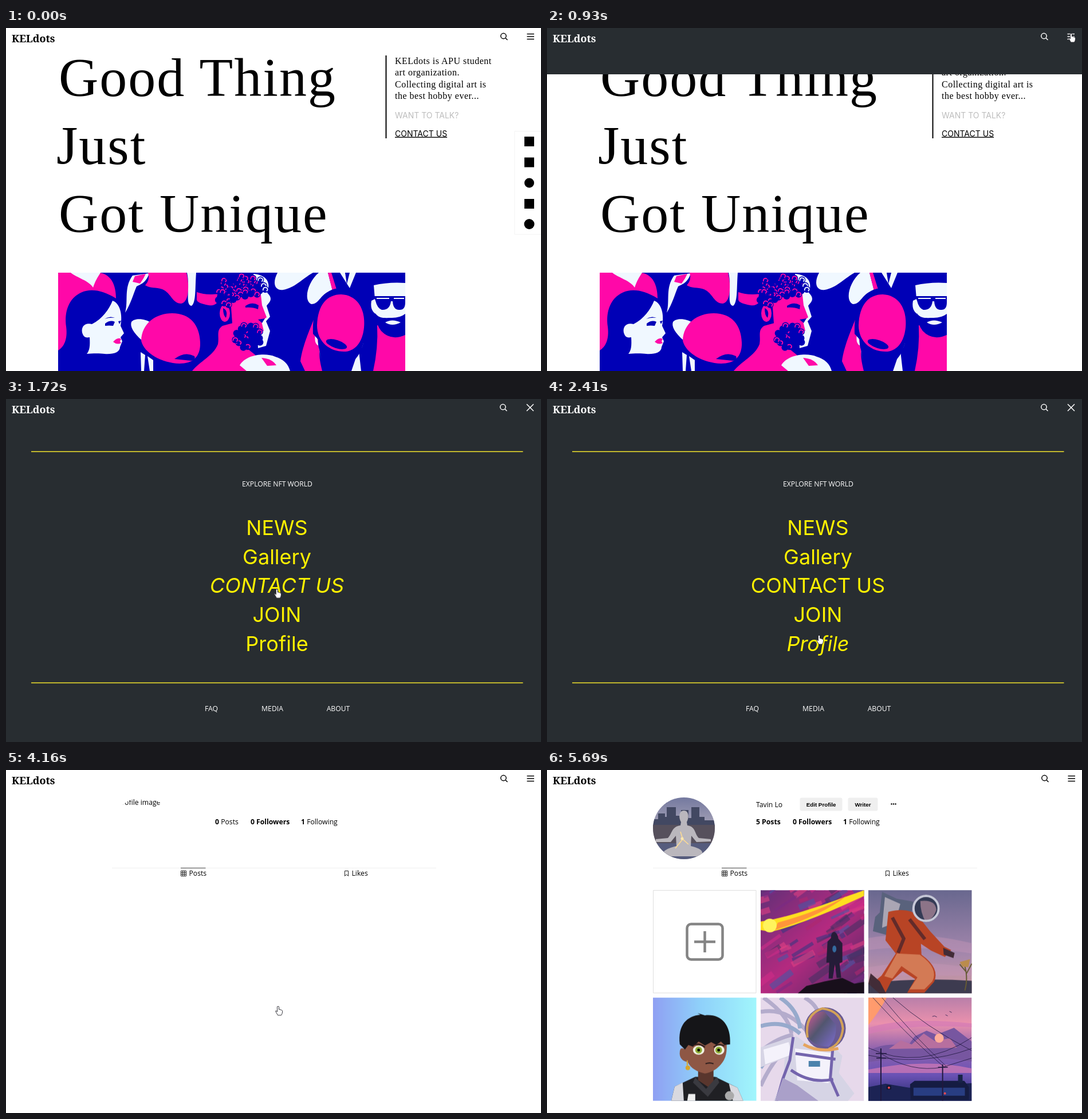
These frames come from a looping animation (934x600 px, 6.18 s). An HTML page:

```html
<!DOCTYPE html>
<html lang="en">
<head>
<meta charset="utf-8">
<title>Student art club</title>
<style>
html, body { margin: 0; width: 100%; height: 100%; overflow: hidden; background: #fff; }
.layer { position: absolute; left: 0; top: 0; width: 934px; height: 600px; overflow: hidden; }
svg { display: block; }
.a { animation: 6180ms step-end infinite; }

.logo { font: 800 18px 'Noto Serif', serif; }
.head { font: 96px 'Liberation Serif', serif; letter-spacing: 2px; }
.intro { font: 16px 'Liberation Serif', serif; letter-spacing: .5px; }
.inter { font: 14px Inter, sans-serif; }
.ui { font: 12.2px 'Open Sans', sans-serif; }
.ui .b { font-weight: 700; }
.btn { font: bold 9.8px 'Liberation Sans', sans-serif; }
.nav { font: 36px Inter, sans-serif; fill: #fff200; text-anchor: middle; }
.line { fill: none; stroke: currentColor; stroke-width: 1.5; }
.blue { fill: #0000b6; }
.pink { fill: #ff08a8; }
.pale { fill: #f0f8ff; }

.shift { animation-name: shift; }
.shift-intro { animation-name: shiftIntro; }
.social { animation-name: social; }
.menu { height: 0; background: #282d31; color: #fff; animation-name: menu; }
.burger { animation-name: burger; }
.close { animation-name: close; }
.news { animation-name: news; }
.gallery { animation-name: gallery; }
.contact { animation-name: contact; }
.join { animation-name: join; }
.prof { animation-name: prof; }
.profile { animation-name: profile; }
.header { animation-name: header; }
.drop { animation-name: drop; }
.icons { animation-name: icons; }
.counts { animation-name: counts; }
.loaded { animation-name: loaded; }
.t1 { animation-name: tiles1; }
.t2 { animation-name: tiles2; }
.t3 { animation-name: tiles3; }
.cursor { animation-name: move; animation-timing-function: linear; }
.hand { animation-name: hand; }
.arrow { animation-name: arrow; }

@keyframes shift { 0% { transform: none } 11.165% { transform: translateX(1px) } }
@keyframes shiftIntro { 0% { transform: none } 11.165% { transform: translateX(10px) } }
@keyframes social { 0% { opacity: 1 } 11.165% { opacity: 0 } }
@keyframes menu {
  0% { height: 0 } 13.107% { height: 8px } 14.078% { height: 30px } 15.049% { height: 81px }
  16.019% { height: 300px } 17.152% { height: 600px } 46.602% { height: 0 }
}
@keyframes burger { 0% { opacity: 1 } 16.019% { opacity: 0 } }
@keyframes close { 0% { opacity: 0 } 16.019% { opacity: 1 } }
@keyframes news { 0% { font-style: normal } 33.01% { font-style: italic } 36.25% { font-style: normal } }
@keyframes gallery {
  0% { font-style: normal } 22.816% { font-style: italic } 25.243% { font-style: normal }
  29.773% { font-style: italic } 33.01% { font-style: normal }
  36.25% { font-style: italic } 37.217% { font-style: normal }
}
@keyframes contact { 0% { font-style: normal } 25.243% { font-style: italic } 29.773% { font-style: normal } }
@keyframes join { 0% { font-style: normal } 37.217% { font-style: italic } 38.9% { font-style: normal } }
@keyframes prof { 0% { font-style: normal } 38.9% { font-style: italic } }
@keyframes profile { 0% { opacity: 0 } 46.602% { opacity: 1 } }
@keyframes header { 0% { opacity: 0 } 47.735% { opacity: 1 } }
@keyframes drop { 0% { transform: translate(-1.5px, -36px) } 47.735% { transform: none } }
@keyframes icons { 0% { opacity: 0 } 48.706% { opacity: 1 } }
@keyframes counts { 0% { opacity: 0 } 67.314% { opacity: 1 } 69.256% { opacity: 0 } }
@keyframes loaded { 0% { opacity: 0 } 69.256% { opacity: 1 } }
@keyframes tiles1 { 0% { opacity: 0 } 74.434% { opacity: 1 } }
@keyframes tiles2 { 0% { opacity: 0 } 75.566% { opacity: 1 } }
@keyframes tiles3 { 0% { opacity: 0 } 76.699% { opacity: 1 } }
@keyframes move {
  0%, .971% { transform: translate(906px, 610px) }
  3.2% { transform: translate(912px, 420px) }
  5.5% { transform: translate(914px, 190px) }
  9.223%, 16.019% { transform: translate(915px, 9px) }
  17.152%, 18.12% { transform: translate(721px, 138px) }
  21.036%, 22.006% { transform: translate(578px, 240px) }
  22.977% { transform: translate(505px, 262px) }
  25.08% { transform: translate(480px, 298px) }
  27.5% { transform: translate(472px, 335px) }
  29.1% { transform: translate(476px, 322px) }
  30.744%, 32.039% { transform: translate(478px, 272px) }
  33.5% { transform: translate(478px, 235px) }
  35.6% { transform: translate(478px, 222px) }
  36.9% { transform: translate(478px, 265px) }
  37.9% { transform: translate(476px, 380px) }
  38.997%, 74.434% { transform: translate(475px, 413px) }
  78% { transform: translate(560px, 440px) }
  83.333%, 87.217% { transform: translate(729px, 462px) }
  92.071%, 100% { transform: translate(882px, 604px) }
}
@keyframes hand {
  0% { opacity: 0 } 3.9% { opacity: 1 } 5.7% { opacity: 0 } 9% { opacity: 1 }
  16.019% { opacity: 0 } 22.7% { opacity: 1 } 74.5% { opacity: 0 }
}
@keyframes arrow {
  0% { opacity: 1 } 3.9% { opacity: 0 } 5.7% { opacity: 1 } 9% { opacity: 0 }
  16.019% { opacity: 1 } 22.7% { opacity: 0 } 74.5% { opacity: 1 }
}
</style>
</head>
<body>
<svg class="layer" viewBox="0 0 934 600">
  <defs>
    <clipPath id="frame"><path d="M91.500 428H697V600H91.500Z"/></clipPath>
    <g id="search" class="line"><circle cx="868" cy="14" r="4.700"/><path d="M871.500 17.500L875 21"/></g>
    <path id="bars" class="line" d="M909.500 10.500H922M909.500 15H922M909.500 19.500H922"/>
    <g id="top">
      <text class="logo" x="10" y="24.500" fill="currentColor">KELdots</text>
      <use href="#search" x=".500"/><use href="#bars"/>
    </g>
  </defs>
  <use href="#top"/>
  <g class="a shift head">
    <text x="92" y="119">Good Thing</text>
    <text x="88" y="238">Just</text>
    <text x="92" y="357">Got Unique</text>
  </g>
  <g class="a shift-intro">
    <path d="M662.500 48H664.500V193H662.500Z"/>
    <g class="intro">
      <text x="679" y="63">KELdots is APU student</text>
      <text x="679" y="83">art organization.</text>
      <text x="679" y="104">Collecting digital art is</text>
      <text x="679" y="124">the best hobby ever...</text>
    </g>
    <g class="inter">
      <text x="679" y="158" fill="#bdbdbd">WANT TO TALK?</text>
      <text x="679" y="189.500" text-decoration="underline">CONTACT US</text>
    </g>
  </g>
  <g class="a social">
    <path d="M940 180.500H888V361H940" fill="none" stroke="#f3f3f3"/>
    <path d="M905 190H922V207H905ZM905 226.500H922V243.500H905ZM905 299H922V316H905Z"/>
    <circle cx="913.500" cy="271" r="8.500"/><circle cx="913.500" cy="343" r="9"/>
  </g>

  <g class="a shift"><g clip-path="url(#frame)">
    <path class="blue" d="M91 428H698V600H91Z"/>
    <!-- woman -->
    <path class="pink" d="M91 428H163C184 431 192 450 192 473C160 453 134 455 117 473C104 488 103 507 105 522C108 545 101 558 91 564Z"/>
    <path class="pale" d="M113 428C124 437 145 442 152 454C156 442 160 436 165 428Z"/>
    <path class="pale" d="M186 477C180 492 168 509 150 518C137 515 131 523 133 533C136 542 140 542 146 541C147 556 146 564 141 570C150 569 166 569 172 570C186 571 199 568 199 558L203 548L200 541L206 534L200 521C204 502 199 481 186 477Z"/>
    <path class="blue" d="M173 517Q182 510 190 514L187 521Q180 520 173 521ZM172 509Q181 503 190 507Q180 506 172 509ZM196 513L201 512L198 518Z"/>
    <path class="pink" d="M187 549Q195 540 201 544L199 548L201 551Q194 555 187 549Z"/>
    <!-- hand and figures above -->
    <path class="pale" d="M208 498C214 477 205 455 221 433L250 429C245 445 236 448 228 452C222 466 218 482 208 498Z"/>
    <path class="pink" d="M225 434L244 430L240 438L234 447L221 444Z"/>
    <path class="pink" d="M248 428H315C321 452 319 480 306 482C290 482 289 464 273 457C261 453 252 456 243 450Q252 440 248 428Z"/>
    <path class="pale" d="M316 428H332C330 455 332 480 324 486C312 485 322 455 316 428Z"/>
    <path class="pink" d="M333 462C345 466 355 467 371 465C375 478 366 487 354 485C343 483 333 480 333 475Z"/>
    <!-- left cap -->
    <path class="pale" d="M238 547C222 533 216 522 219 514C225 506 245 509 252 515L240 540Z"/>
    <path class="pink" d="M236 547C237 516 262 499 290 499C322 499 338 520 339 550C340 576 325 587 303 587C272 586 241 569 236 547Z"/>
    <path class="blue" d="M294 579Q312 565 329 574Q332 581 323 582Z"/>
    <path class="pale" d="M235 567L243 572L241 600H236ZM247 574L257 581V600H251Z"/>
    <!-- bearded man -->
    <path class="pink" d="M325 600C338 583 362 574 370 553C373 540 366 529 378 521L400 515L420 560C436 572 447 580 452 600Z"/>
    <path class="pale" d="M408 590C420 570 454 568 470 575C484 579 493 588 496 600H420Z"/>
    <path class="pink" d="M446 577Q464 578 472 590L456 591Z"/>
    <path class="pale" d="M432 430C455 432 463 445 456 463C468 475 459 480 455 486L461 505L454 513L461 530L454 556L440 560Z"/>
    <path class="pink" d="M392 475C394 452 432 440 444 458L447 485L455 506L446 513L450 530L396 530Z"/>
    <ellipse class="pink" cx="382" cy="499" rx="9" ry="15"/>
    <path class="blue" d="M379 490Q388 494 384 507Q379 503 379 490ZM418 486Q430 478 441 485L440 492Q430 488 418 489ZM440 510L452 508L447 516Z"/>
    <g id="curls"></g>
    <!-- right cap -->
    <path class="pale" d="M474 428C465 445 468 460 484 458C505 454 515 440 536 428ZM546 428C526 445 519 477 533 483C548 483 548 464 570 459L562 428ZM583 428H611L600 455Z"/>
    <path class="pink" d="M562 428L568 428L577 457L570 460Z"/>
    <path class="blue" d="M592 428L595 448L600 428Z"/>
    <path class="pink" d="M514 583C518 553 533 522 541 500L550 553C544 570 549 586 552 600H522Z"/>
    <path class="pale" d="M541 530Q536 552 546 556L550 580ZM623 541Q626 557 616 565L620 600H603Z"/>
    <path class="blue" d="M536 535C534 485 553 455 585 455C620 455 635 490 628 527C625 562 613 589 584 592C555 591 543 563 545 545Z"/>
    <path class="pink" d="M543 520C544 484 561 466 585 466C612 467 628 490 625 524C622 553 607 566 590 566C565 566 543 549 543 520Z"/>
    <ellipse class="blue" cx="577" cy="553" rx="19" ry="7" transform="rotate(18 577 553)"/>
    <!-- man in glasses -->
    <path class="pink" d="M648 520L697 528V600H641Q650 560 648 520Z"/>
    <path class="pale" d="M642 450Q668 444 697 446V520H653L645 500Q635 493 638 477L644 474Z"/>
    <path class="blue" d="M642 469H697V480Q697 494 686 493Q676 493 675 478H672Q670 494 656 493Q648 490 645 477ZM645 499C651 509 662 507 674 507Q688 507 697 500V537Q672 548 655 530Q646 519 645 499Z"/>
    <path class="pale" d="M662 515Q674 508 689 515Q674 523 662 515ZM647 472H669V474H647ZM677 472H695V474H677Z"/>
  </g></g>
</svg>

<div class="layer a menu">
  <svg width="934" height="600" viewBox="0 0 934 600">
    <text class="logo" x="10" y="24.500" fill="#fff">KELdots</text>
    <use href="#search" x="-.500"/>
    <use class="a burger" href="#bars" x="-1"/>
    <path class="a close line" d="M909 9L921 21M921 9L909 21"/>
    <path d="M44 92H902.500M44 496.500H902.500" stroke="#f5e62c" stroke-width="1.500"/>
    <g class="ui" fill="#fff" text-anchor="middle">
      <text x="473.500" y="152.500">EXPLORE NFT WORLD</text>
      <text x="358.500" y="546">FAQ</text>
      <text x="465" y="546">MEDIA</text>
      <text x="580" y="546">ABOUT</text>
    </g>
    <g class="nav">
      <text class="a news" x="473" y="238">NEWS</text>
      <text class="a gallery" x="473" y="288.500">Gallery</text>
      <text class="a contact" x="473" y="339">CONTACT US</text>
      <text class="a join" x="473" y="390">JOIN</text>
      <text class="a prof" x="473" y="440.500">Profile</text>
    </g>
  </svg>
</div>

<svg class="layer a profile" viewBox="0 0 934 600">
  <defs>
    <clipPath id="round"><circle cx="239" cy="102" r="54"/></clipPath>
    <linearGradient id="dusk" x2="0" y2="1"><stop stop-color="#74799f"/><stop offset=".5" stop-color="#aaa6b9"/><stop offset="1" stop-color="#8b8798"/></linearGradient>
    <linearGradient id="magenta" x2="1" y2="1"><stop stop-color="#633078"/><stop offset=".5" stop-color="#b52a80"/><stop offset="1" stop-color="#4c2b66"/></linearGradient>
    <linearGradient id="mauve" x2="0" y2="1"><stop stop-color="#69688f"/><stop offset=".6" stop-color="#a286ac"/><stop offset=".9" stop-color="#c596a5"/></linearGradient>
    <linearGradient id="aqua" x2="1"><stop stop-color="#8fa0f3"/><stop offset=".45" stop-color="#8fd0fa"/><stop offset="1" stop-color="#a1f6fc"/></linearGradient>
    <linearGradient id="sunset" x2="0" y2="1"><stop stop-color="#b97fa9"/><stop offset=".25" stop-color="#eb91ad"/><stop offset=".5" stop-color="#8e62ae"/><stop offset=".75" stop-color="#6a52b5"/><stop offset="1" stop-color="#252a6c"/></linearGradient>
    <linearGradient id="visor" x2="1" y2="1"><stop stop-color="#d35b98"/><stop offset=".45" stop-color="#52566f"/><stop offset="1" stop-color="#7d6ccf"/></linearGradient>
  </defs>
  <path d="M0 0H934V600H0Z" fill="#fff"/>
  <use class="a header" href="#top"/>
  <g class="a drop ui">
    <g clip-path="url(#round)"><text x="195" y="60.500">Profile image</text></g>
    <path d="M185 171.500H751" stroke="#efefef"/>
    <path d="M305 171.500H348.500" stroke="#444"/>
    <text x="319.500" y="185">Posts</text>
    <text x="603.500" y="185">Likes</text>
  </g>
  <g class="a icons" fill="none" stroke="#222">
    <path d="M305.500 176.500H314.500V185.500H305.500ZM308.500 176V186M311.500 176V186M305 179.500H315M305 182.500H315M591.500 176.500H597.500V185.500L594.500 182.500L591.500 185.500Z"/>
  </g>
  <g class="a counts ui">
    <text x="365" y="95"><tspan class="b">0</tspan> Posts</text>
    <text class="b" x="427" y="95">0 Followers</text>
    <text x="515" y="95"><tspan class="b">1</tspan> Following</text>
  </g>
  <g class="a loaded">
    <g clip-path="url(#round)">
      <path d="M185 48H293V157H185Z" fill="url(#dusk)"/>
      <path d="M185 86H194V76H206V82H209V65H225V80H234V70H247V84H252V65H266V82H275V88H293V100H185Z" fill="#424862"/>
      <path d="M185 96H293V128H185Z" fill="#56505c"/>
      <path d="M185 128H293V157H185Z" fill="#565c7d"/>
      <path d="M239 71C247 71 249 82 244 91L245 97C260 99 257 111 265 119L286 121V125L261 126L252 115L251 133C273 138 277 147 263 151H210C197 149 200 139 226 133L225 115L216 126L190 126V121L211 119C219 111 217 99 233 97L234 91C229 82 231 71 239 71Z" fill="#bab7bd"/>
      <path d="M233 108L237 121L247 130M237 121L224 137" fill="none" stroke="#ffdc91" stroke-width="1.500"/>
      <circle cx="236" cy="120" r="2.500" fill="#ffe8ae"/>
    </g>
    <g class="ui">
      <text x="365" y="64.500">Tavin Lo</text>
      <g class="b"><text x="365" y="95">5 Posts</text><text x="429" y="95">0 Followers</text></g>
      <text x="517" y="95"><tspan class="b">1</tspan> Following</text>
    </g>
    <g fill="#efefef"><rect x="441.500" y="48.500" width="74" height="23" rx="3"/><rect x="525.500" y="48.500" width="52" height="23" rx="3"/></g>
    <g class="btn" text-anchor="middle"><text x="478.500" y="64">Edit Profile</text><text x="551.500" y="64">Writer</text></g>
    <circle cx="601.500" cy="59.500" r="1.200"/><circle cx="605" cy="59.500" r="1.200"/><circle cx="608.500" cy="59.500" r="1.200"/>
    <path d="M185.500 210.500H365V390H185.500Z" fill="none" stroke="#dedede"/>
    <g fill="none" stroke="#848484" stroke-width="4.500"><rect x="244.500" y="269.500" width="62" height="62" rx="7"/><path d="M257 300.500H294M275.500 282V319"/></g>
  </g>

  <g class="a t1">
    <svg x="373" y="210" width="180.500" height="181" viewBox="0 0 181 181">
      <path d="M0 0H181V181H0Z" fill="url(#magenta)"/>
      <g id="strokes"></g>
      <path d="M0 55C50 48 120 22 181 0V10C130 34 70 60 18 73L0 70Z" fill="#ffdf20"/>
      <path d="M30 57Q110 34 150 10Q110 43 24 70Z" fill="#ff963a"/>
      <circle cx="16" cy="62" r="12" fill="#fff45c"/>
      <path d="M65 181L80 168L112 160L143 154L164 164L181 161V181Z" fill="#180f1b"/>
      <path d="M129 73Q135 76 136 85L143 93V126L138 128L141 154H133L130 130L126 155H119L120 127H115L117 90L123 84Q123 73 129 73Z" fill="#251c38"/>
      <ellipse cx="129" cy="103" rx="3.500" ry="6" fill="#356b9f"/>
    </svg>
    <svg x="185" y="398" width="180.500" height="181" viewBox="0 0 181 181">
      <path d="M0 0H181V181H0Z" fill="url(#aqua)"/>
      <path d="M32 181L38 156L74 139H109L148 158L158 181Z" fill="#202024"/>
      <path d="M32 181L38 156L52 149L54 181ZM133 151L148 158L158 181H140Z" fill="#d9d9df"/>
      <path d="M79 120H106V148L97 157L79 145Z" fill="#59362d"/>
      <path d="M54 66Q89 49 127 67Q133 98 122 113Q110 130 91 133Q68 128 61 113Q45 110 47 94Q48 86 55 90Z" fill="#8e5745"/>
      <path d="M47 82C43 47 60 32 83 30L78 27L91 31C117 28 137 45 135 82L125 83L119 77L111 83L102 78L91 84L80 77L70 86L62 83L56 91Z" fill="#151518"/>
      <ellipse cx="80" cy="92" rx="10" ry="8" fill="#f2f4e7"/><ellipse cx="116" cy="92" rx="9" ry="8" fill="#f2f4e7"/>
      <circle cx="80" cy="92" r="6" fill="#8fac35"/><circle cx="115" cy="92" r="6" fill="#8fac35"/>
      <circle cx="80" cy="92" r="2.500"/><circle cx="115" cy="92" r="2.500"/>
      <path d="M69 84Q80 78 91 87M106 87Q116 79 125 85M92 116Q99 113 106 116" fill="none" stroke="#25191a" stroke-width="2"/>
      <path d="M60 110V119" stroke="#d9a629" stroke-width="2"/><circle cx="61" cy="123" r="4" fill="#d9a629"/>
      <path d="M74 140L93 160L112 139L116 149L96 174L70 149Z" fill="#3a3a40"/>
      <path d="M62 169H74V181H60Z" fill="#eee"/><circle cx="134" cy="172" r="8" fill="#aaa"/>
    </svg>
  </g>
  <g class="a t2">
    <svg x="561" y="210" width="180.500" height="181" viewBox="0 0 181 181">
      <path d="M0 0H181V181H0Z" fill="url(#mauve)"/>
      <path d="M0 84Q80 69 181 93V111Q70 95 0 105ZM0 135Q90 120 181 137V150H0Z" fill="#c396b5" opacity=".45"/>
      <path d="M0 163Q90 153 181 159V181H0Z" fill="#3d3b50"/>
      <path d="M24 3L50 15L79 20L70 65L37 80L8 72L12 47L20 39Z" fill="#59627c"/>
      <path d="M29 12L56 24L47 57L24 66Z" fill="#aaa6b4"/>
      <path d="M35 38Q70 29 87 45L108 72L133 99L145 105L134 117L110 106L92 94L93 113Q126 137 115 161L98 180H68L82 156L60 142L40 160L30 180L5 165L23 150L48 111L30 88Z" fill="#b84425"/>
      <path d="M50 111L90 113Q124 137 112 160L98 174H72L86 153L58 133L42 155L28 151Z" fill="#d37a55"/>
      <path d="M42 48L62 85L52 110M72 51L99 86" fill="none" stroke="#622b2a" stroke-width="6"/>
      <path d="M131 101L151 110L149 119L132 113ZM4 146L20 160L31 181H19L0 164Z" fill="#422c37"/>
      <circle cx="101" cy="32" r="24" fill="#343b55"/><path d="M91 19Q117 16 119 34Q114 51 100 55Q91 39 91 19Z" fill="#8c7488"/>
      <circle cx="101" cy="32" r="22" fill="none" stroke="#c8cad9" stroke-width="4"/>
      <path d="M169 176Q176 150 166 125M172 146L181 129M171 143L160 130" fill="none" stroke="#665b35" stroke-width="2"/>
      <path d="M160 126L178 121L175 135L165 134Z" fill="#ba8c4c"/>
    </svg>
  </g>
  <g class="a t3">
    <svg x="373" y="398" width="180.500" height="181" viewBox="0 0 181 181">
      <path d="M0 0H181V181H0Z" fill="#e7d9eb"/>
      <g fill="none" stroke-width="7" opacity=".65"><path d="M0 25Q45 16 82 60M5 0Q48 30 54 62M77 0Q97 11 102 30M0 94Q29 70 57 65M0 155Q20 110 50 84" stroke="#9a95bd"/><path d="M0 50Q40 38 69 63M34 0Q65 20 69 54M0 123Q23 90 40 81" stroke="#6d91bd"/></g>
      <path d="M0 87L45 72L63 68L84 83L130 88L143 102L137 132L164 168L153 181H23L40 139L42 106L0 122Z" fill="#d6d4e5"/>
      <path d="M5 91L49 78L54 100L8 117ZM60 89L123 97L119 150L64 145Z" fill="#f4f2fb"/>
      <path d="M57 69L51 110L39 142L28 181M61 98L131 108M126 92L122 141L136 173M53 127Q88 152 127 143" fill="none" stroke="#7464ad" stroke-width="5"/>
      <path d="M39 141L64 154L101 181H25Z" fill="#aaa0c9"/>
      <path d="M84 111H104V121H84Z" fill="#4c82ac"/>
      <ellipse cx="113" cy="54" rx="36" ry="37" fill="#695a93"/>
      <path d="M82 67Q79 26 111 24L132 48Q133 75 119 86Q91 85 82 67Z" fill="url(#visor)"/>
      <path d="M82 70Q76 30 108 19Q141 23 144 54Q141 82 119 90" fill="none" stroke="#d3a258" stroke-width="4"/>
      <path d="M75 82Q102 97 136 89" fill="none" stroke="#e6a45d" stroke-width="5"/>
    </svg>
    <svg x="561" y="398" width="180.500" height="181" viewBox="0 0 181 181">
      <path d="M0 0H181V181H0Z" fill="url(#sunset)"/>
      <path d="M0 0H32Q20 23 0 48Z" fill="#ff9b6d"/>
      <path d="M0 93Q38 75 67 88L81 68L102 58L119 65L150 53L181 77V112Q90 98 0 113Z" fill="#7756a0"/>
      <path d="M36 90L57 75L76 82L97 63L116 76L143 71L155 88Z" fill="#b76f9f"/>
      <circle cx="124" cy="71" r="8" fill="#ffad9a"/>
      <path d="M0 53Q60 33 181 45V52Q65 46 0 64ZM0 126Q100 106 181 124V132H0Z" fill="#d47bb7" opacity=".7"/>
      <path d="M0 157L30 151L71 158L181 150V181H0Z" fill="#1c2354"/>
      <path d="M73 152L81 146H168L176 157V179H74Z" fill="#151c42"/>
      <path d="M79 158H169V172H79Z" fill="#283d82"/><path d="M157 135H165V149H157Z" fill="#182347"/>
      <g fill="none" stroke="#20183f"><path d="M22 89V181M130 117V181" stroke-width="2"/><path d="M13 98H32M14 106H31M122 122H139" stroke-width="1.500"/><path d="M8 0Q70 68 134 123M24 0Q82 70 136 120M43 0Q100 51 181 93M0 88Q90 130 181 70M0 101Q96 121 181 89M22 98Q75 132 130 122L181 106" stroke-width=".8"/></g>
      <path d="M32 154H40V161H32Z" fill="#101633"/><circle cx="36" cy="158" r="2" fill="#ef4a50"/><circle cx="134" cy="168" r="2" fill="#ef4a50"/>
      <path d="M112 33L116 32L120 34M142 24L146 26M135 30L139 32" fill="none" stroke="#4a315f"/>
    </svg>
  </g>
</svg>

<svg class="layer" viewBox="0 0 934 600">
  <g class="a cursor" fill="#fff" stroke="#24242c" stroke-width=".9" stroke-linejoin="round">
    <path class="a arrow" d="M0 0V11.500L2.600 9.200L4.500 13.200L6.300 12.300L4.500 8.500H8Z"/>
    <path class="a hand" d="M-1.500 1Q0 -.500 1.500 1V6Q3 5 4 6.500Q5.500 5.800 6 7.300Q7.300 7 7.500 8.500V11Q7 14 5.500 16H-.500Q-2 13 -4 10Q-5 8 -3.500 8L-1.500 10Z"/>
  </g>
</svg>

<script>
let seed = 7;
const rand = () => (seed = seed * 16807 % 2147483647) / 2147483647;
const pick = list => list[Math.floor(rand() * list.length)];

function add(parent, name, attrs) {
  const el = document.createElementNS('http://www.w3.org/2000/svg', name);
  for (const key in attrs) el.setAttribute(key, attrs[key]);
  parent.append(el);
}

// Curly patch: dark locks with thin bright crescents
function curls(cx, cy, rx, ry, count, bright) {
  const box = document.getElementById('curls');
  for (let i = 0; i < count; i++) {
    const d = Math.sqrt((i + .5) / count), a = i * 2.4;
    const x = cx + rx * d * Math.cos(a), y = cy + ry * d * Math.sin(a);
    add(box, 'circle', { cx: x, cy: y, r: 6, fill: '#0000b6' });
    if (rand() < bright) add(box, 'path', {
      d: `M${x - 4} ${y + 2}q0 -7 6 -5q4 3 0 6`,
      fill: 'none', stroke: x > 443 ? '#f0f8ff' : '#ff08a8', 'stroke-width': 1.8
    });
  }
}
curls(411, 452, 44, 20, 44, .75);
curls(384, 471, 16, 14, 12, .5);
curls(423, 540, 24, 22, 32, .35);

const paint = document.getElementById('strokes');
for (let i = 0; i < 85; i++) {
  const x = rand() * 190 - 8, y = rand() * 190 - 5, w = 10 + rand() * 30;
  add(paint, 'path', {
    d: `M${x} ${y}l${w} ${-w * (.3 + rand() * .5)}`,
    stroke: pick(['#d02c88', '#7b2b86', '#3a3682', '#b0286f', '#e04083', '#493064', '#4a56a5']),
    'stroke-width': 3 + rand() * 9, opacity: .6
  });
}
</script>
</body>
</html>
```
